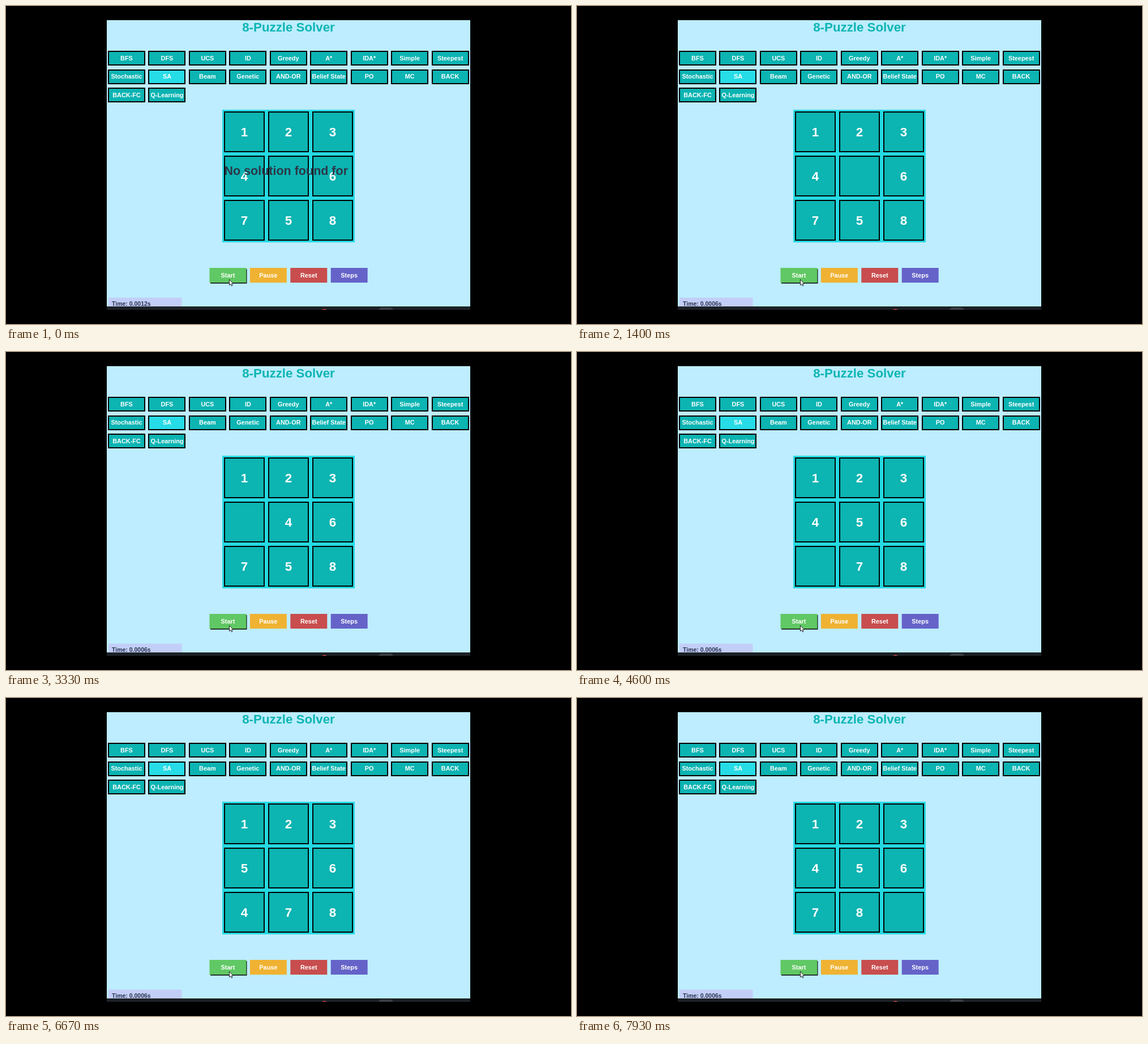
An HTML page for the animation above (8 s loop, 998x561 px).

```html
<!DOCTYPE html>
<html lang="en">
<head>
<meta charset="utf-8">
<title>8-Puzzle Solver</title>
<style>
  html, body { margin: 0; width: 100%; height: 100%; overflow: hidden; background: #000; }
  svg { display: block; width: 100%; height: 100%; }
  text { font: bold 10.9px "Liberation Sans", Arial, sans-serif; fill: #fff; text-anchor: middle; }
  .outlined { fill: #0cb4b2; stroke: #000; stroke-width: 2; }
  .active { fill: #26dce6; }
  .tile text { font-size: 22.4px; }
  .title { font-size: 22.3px; fill: #0bb5b3; }
  .message { font-size: 21.5px; fill: #2c3848; text-anchor: start; }
  .time { font-size: 10.5px; fill: #2b3550; text-anchor: start; }
</style>
</head>
<body>
<svg viewBox="0 0 998 561">
  <rect width="998" height="561"/>
  <rect x="178" y="25" width="642" height="505" fill="#bdedff"/>
  <text class="title" x="499" y="45">8-Puzzle Solver</text>
  <g id="methods"></g>
  <rect x="382" y="183" width="234" height="234" fill="#24d9e1"/>
  <g id="board"></g>
  <text id="message" class="message" x="385.5" y="298">No solution found for</text>
  <rect x="361" y="464" width="64.5" height="25.5"/>
  <g id="controls"></g>
  <rect x="181" y="514.5" width="129.5" height="16" fill="#c3cef8"/>
  <text id="time" class="time" x="187" y="529"></text>
  <rect x="178" y="530" width="642" height="6" fill="#1c2126"/>
  <path d="M558 536q4.500-3 9 0z" fill="#e5484d"/>
  <path d="M658 536q2-4 6-4h14q4 0 6 4z" fill="#3a3f44"/>
  <path d="M394.500 482.500v10l2.300-2 1.600 3.300 1.600-.8-1.600-3.100h3z" fill="#fff" stroke="#111" stroke-width=".9"/>
</svg>
<script>
const LOOP = 8000, FPS = 15;
const CLEAR_AT = 200, FIRST_MOVE = 264, MOVE_EVERY = 364;
const START = "1234 6758";
const BLANK_MOVES = "UDLRLUDUDRDLRLUDURLDRR";
const SHIFT = { U: -3, D: 3, L: -1, R: 1 };

const byId = id => document.getElementById(id);

function add(parent, name, attrs, content = "") {
  const node = document.createElementNS("http://www.w3.org/2000/svg", name);
  for (const key in attrs) node.setAttribute(key, attrs[key]);
  node.textContent = content;
  return parent.appendChild(node);
}

const methods = ["BFS", "DFS", "UCS", "ID", "Greedy", "A*", "IDA*", "Simple", "Steepest",
  "Stochastic", "SA", "Beam", "Genetic", "AND-OR", "Belief State", "PO", "MC", "BACK",
  "BACK-FC", "Q-Learning"];
methods.forEach((label, i) => {
  const x = 213 + (i % 9) * 71.45, y = 92 + Math.floor(i / 9) * 32.5;
  add(byId("methods"), "rect", {
    class: label === "SA" ? "outlined active" : "outlined",
    x: Math.round(x - 32), y: Math.round(y - 12), width: 64, height: 24
  });
  add(byId("methods"), "text", { x, y: y + 3.8 }, label);
});

const controls = [["Start", "#60c864"], ["Pause", "#f0b232"], ["Reset", "#c84d4e"], ["Steps", "#6563c8"]];
controls.forEach(([label, fill], i) => {
  const x = 392 + i * 71.4;
  add(byId("controls"), "rect", { x: x - 32.5, y: 462, width: 65, height: 26, fill });
  add(byId("controls"), "text", { x, y: 478.8 }, label);
});

const digits = Array.from(START, (_, i) => {
  const x = 421 + (i % 3) * 78, y = 222 + Math.floor(i / 3) * 78;
  const tile = add(byId("board"), "g", { class: "tile" });
  add(tile, "rect", { class: "outlined", x: x - 35, y: y - 35, width: 70, height: 70 });
  return add(tile, "text", { x, y: y + 8 });
});

function boardAfter(count) {
  const cells = [...START];
  let blank = cells.indexOf(" ");
  for (const move of BLANK_MOVES.slice(0, count)) {
    const next = blank + SHIFT[move];
    cells[blank] = cells[next];
    cells[next] = " ";
    blank = next;
  }
  return cells;
}

function draw(now) {
  // Screen updates land on a fixed frame rate.
  const t = Math.floor((now % LOOP + 4) * FPS / 1000) * 1000 / FPS;
  const cleared = t >= CLEAR_AT - 1;
  const count = Math.max(0, Math.floor((t - FIRST_MOVE) / MOVE_EVERY) + 1);
  boardAfter(count).forEach((digit, i) => { digits[i].textContent = digit; });
  byId("message").style.display = cleared ? "none" : "";
  byId("time").textContent = cleared ? "Time: 0.0006s" : "Time: 0.0012s";
}

const begin = performance.now();
function tick() {
  draw(performance.now() - begin);
  requestAnimationFrame(tick);
}
tick();
</script>
</body>
</html>
```
